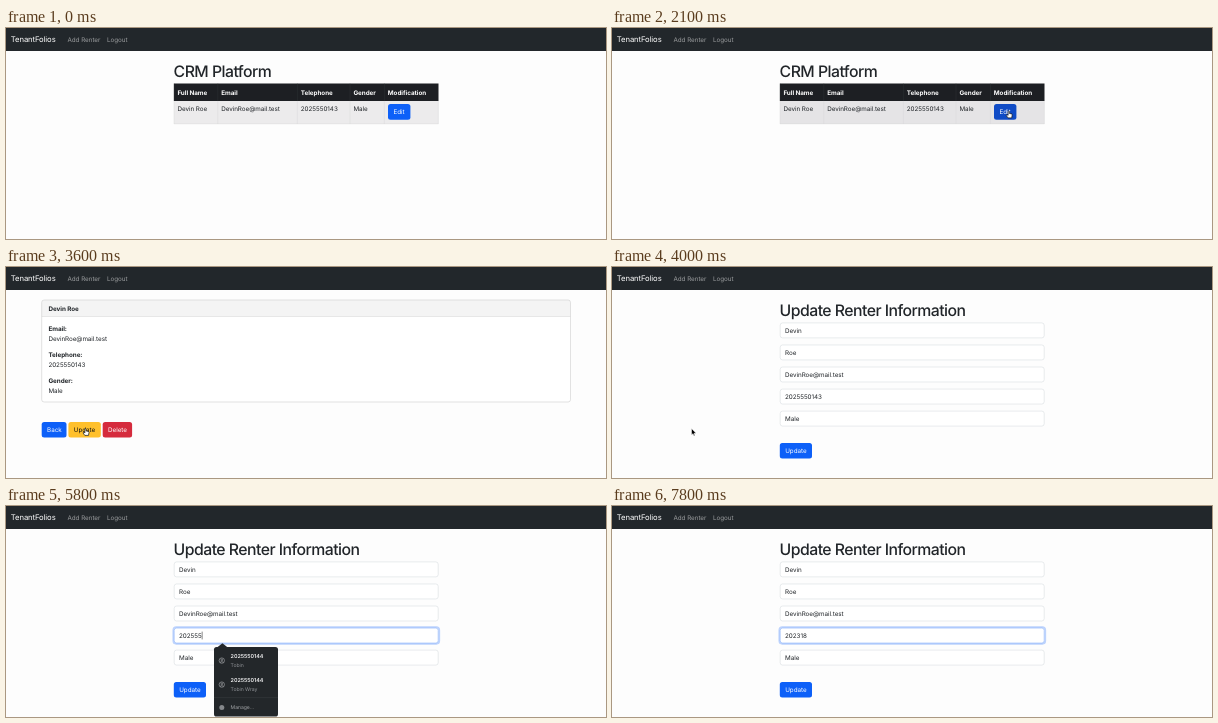
An HTML page that plays this animation: 600x211 px, repeating every 8 s.

```html
<!DOCTYPE html>
<html lang="en">
<head>
<meta charset="utf-8">
<title>CRM Platform</title>
<style>
html, body { margin: 0; width: 100%; height: 100%; overflow: hidden; background: #fdfdfd; }
svg { display: block; width: 600px; height: 211px; }
text { font: 400 6.3px Inter, "Liberation Sans", sans-serif; letter-spacing: -.04px; text-rendering: geometricPrecision; white-space: pre; }
text.b { font-weight: 700; }
text.h1 { font-size: 15.8px; font-weight: 500; letter-spacing: -.53px; }
text.brand { font-size: 7.7px; letter-spacing: -.1px; }
text.tip { font-size: 5.4px; font-weight: 600; }
text.sub { font-size: 5.1px; }
</style>
</head>
<body>
<svg id="stage" viewBox="0 0 600 211"></svg>
<script>
const LOOP = 8000, STEP = 100;
const INK = '#212529';
const BLUE = '#0d60f8', BLUE_HOVER = '#0f51d0', BLUE_DOWN = '#0f4bc6';
const YELLOW = '#ffb80a', YELLOW_HOVER = '#ffc02c', YELLOW_DOWN = '#ffc648';

const FIRST = 'Devin', LAST = 'Roe', NAME = FIRST + ' ' + LAST;
const EMAIL = 'DevinRoe@mail.test', PHONE = '2025550143', GENDER = 'Male';
const SAVED = [['2025550144', 'Tobin'], ['2025550144', 'Tobin Wray']];

const stage = document.getElementById('stage');

function add(parent, tag, attrs = {}, content) {
  const el = document.createElementNS('http://www.w3.org/2000/svg', tag);
  for (const key in attrs) el.setAttribute(key, attrs[key]);
  if (content) el.textContent = content;
  parent.appendChild(el);
  return el;
}
const group = parent => add(parent, 'g');
const rect = (p, x, y, width, height, fill, more) =>
  add(p, 'rect', { x, y, width, height, fill, ...more });
const path = (p, d, more) => add(p, 'path', { d, ...more });
const text = (p, x, y, content, cls = '', fill = INK) =>
  add(p, 'text', { x, y, class: cls, fill }, content);
const show = (el, on) => el.setAttribute('display', on ? 'inline' : 'none');

function button(p, x, y, w, label, fill, color = '#fff') {
  const box = rect(p, x, y, w, 15.6, fill, { rx: 2.5 });
  text(p, x + 5.4, y + 10.2, label, '', color);
  return box;
}

// Navigation bar
rect(stage, 0, 0, 600, 211, '#fdfdfd');
rect(stage, 0, 0, 600, 23, '#22272b');
text(stage, 4.8, 14.3, 'TenantFolios', 'brand', '#fff');
text(stage, 61.5, 14, 'Add Renter', '', '#9a9c9e');
text(stage, 101, 14, 'Logout', '', '#9a9c9e');

// List page
const list = group(stage);
text(list, 167.6, 48.8, 'CRM Platform', 'h1');
const row = rect(list, 168, 73, 264.5, 23, '#ecebec');
rect(list, 168, 55.5, 264.5, 17.5, '#1d1f23');
const columns = [
  [168, 'Full Name', NAME], [211.8, 'Email', EMAIL], [291.4, 'Telephone', PHONE],
  [344, 'Gender', GENDER], [378.4, 'Modification', '']
];
for (const [x, head, value] of columns) {
  path(list, `M${x} 55.5V73`, { stroke: '#34383c', 'stroke-width': .4 });
  path(list, `M${x} 73V96`, { stroke: '#d3d4d6', 'stroke-width': .4 });
  text(list, x + 3.4, 66.8, head, 'b', '#fff');
  text(list, x + 3.4, 83.4, value);
}
path(list, 'M168 95.8H432.3V73', { fill: 'none', stroke: '#d3d4d6', 'stroke-width': .4 });
const edit = button(list, 382, 76.1, 22.4, 'Edit', BLUE);

// Detail page
const detail = group(stage);
rect(detail, 35.7, 33, 528.8, 102, '#fff', { rx: 2.4 });
path(detail, 'M35.7 49.5V35.4Q35.7 33 38.1 33H562.1Q564.5 33 564.5 35.4V49.5Z', { fill: '#f4f4f4' });
path(detail, 'M35.7 49.5H564.5', { stroke: '#d4d4d4', 'stroke-width': .5 });
rect(detail, 35.7, 33, 528.8, 102, 'none', { rx: 2.4, stroke: '#cfcfcf', 'stroke-width': .6 });
text(detail, 42.4, 43.9, NAME, 'b');
[['Email:', EMAIL], ['Telephone:', PHONE], ['Gender:', GENDER]].forEach(([label, value], i) => {
  text(detail, 42.4, 63.8 + 26.1 * i, label, 'b');
  text(detail, 42.4, 73.7 + 26.1 * i, value);
});
button(detail, 35.7, 155, 24.8, 'Back', BLUE);
const update = button(detail, 62.4, 155, 32.4, 'Update', YELLOW, '#111');
button(detail, 96.7, 155, 29.4, 'Delete', '#d52b3d');

// Form page
const form = group(stage);
text(form, 167.6, 48.8, 'Update Renter Information', 'h1');
const ring = rect(form, 167.3, 121.2, 266, 16.6, 'none', { rx: 3, stroke: '#bdd3fd', 'stroke-width': 1.7 });
const fields = [FIRST, LAST, EMAIL, PHONE, GENDER].map((value, i) => {
  const y = 55.9 + 22.05 * i;
  const box = rect(form, 168.2, y, 264, 15, '#fff', { rx: 2.4, stroke: '#d9dde1', 'stroke-width': .6 });
  return { box, label: text(form, 173, y + 9.9, value) };
});
const phone = fields[3];
const caret = rect(form, 0, 125.6, .5, 7.8, '#111');
button(form, 167.8, 175.9, 32.2, 'Update', BLUE);

// Suggestions
const popup = group(form);
path(popup, 'M211 141.5L216.4 137.3L221.8 141.5Z', { fill: '#23272a' });
rect(popup, 208, 141, 64, 69.6, '#23272a', { rx: 2.6 });
SAVED.forEach(([number, owner], i) => {
  const y = 154.6 + 24 * i;
  const icon = add(popup, 'g', { fill: 'none', stroke: '#a9acaf', 'stroke-width': .6 });
  add(icon, 'circle', { cx: 215.8, cy: y, r: 2.7 });
  add(icon, 'circle', { cx: 215.8, cy: y - .7, r: .85 });
  path(icon, `M214 ${y + 1.8}Q215.8 ${y + .2} 217.6 ${y + 1.8}`);
  text(popup, 224.6, y - 2.5, number, 'tip', '#f2f2f3');
  text(popup, 224.6, y + 6.2, owner, 'sub', '#8f9296');
});
path(popup, 'M208 191.6H272', { stroke: '#3b3f43', 'stroke-width': .5 });
add(popup, 'circle', { cx: 215.8, cy: 201.4, r: 2.5, fill: '#85888b' });
text(popup, 224.6, 203.3, 'Manage...', 'sub', '#a0a3a6');

// Pointers, each with its hot spot at 0,0
const pointer = group(stage);
const arrow = path(pointer, 'M0 0V6.5L1.5 5.2L2.5 7.4L3.5 7L2.5 4.8H4.6Z',
  { fill: '#000', stroke: '#fff', 'stroke-width': .5 });
const hand = path(pointer,
  'M-.6 .4Q0-.5 .6 .4V2.4L2.9 2.9Q3.6 3.1 3.5 4L3 6.9H-.7L-2.4 4.5Q-2.5 3.5-1.5 3.7L-.6 4.4Z',
  { fill: '#fff', stroke: '#111', 'stroke-width': .7, 'stroke-linejoin': 'round' });
const beam = path(pointer, 'M-1.3-3.2Q0-3.2 0-2.4Q0-3.2 1.3-3.2M0-2.4V2.4M-1.3 3.2Q0 3.2 0 2.4Q0 3.2 1.3 3.2',
  { fill: 'none', stroke: '#222', 'stroke-width': .7 });

// Pointer path: time, x, y
const route = [
  [300, 415, 187], [500, 413, 160], [700, 406, 118], [900, 399, 88], [1100, 395.5, 82],
  [1500, 395.5, 82], [1700, 396.7, 83], [2300, 396.7, 83], [2500, 300, 106], [2700, 175, 130],
  [2900, 133, 136], [3100, 88, 146], [3300, 50, 151], [3500, 74, 160], [3600, 79.5, 161.5],
  [4000, 79.5, 161.5], [4300, 190, 148], [4500, 204, 141], [4700, 217, 128.4], [5300, 217, 128.4]
];
// Field edits: time, value
const edits = [
  [4800, PHONE],
  ...[[5300, 9], [5500, 8], [5700, 7], [5800, 6], [5900, 4], [6000, 3]].map(([t, n]) => [t, PHONE.slice(0, n)]),
  [6700, '2023'], [7000, '20231'], [7300, '202318']
];

function pointAt(t) {
  const i = Math.max(1, route.findIndex(p => p[0] >= t));
  const [t0, x0, y0] = route[i - 1], [t1, x1, y1] = route[i];
  const k = (t - t0) / (t1 - t0);
  return [x0 + (x1 - x0) * k, y0 + (y1 - y0) * k];
}
const inside = (x, y, l, t, r, b) => x >= l && x <= r && y >= t && y <= b;

function drawPointer(t, page) {
  const visible = t >= 300 && t < 5300;
  show(pointer, visible);
  const [x, y] = visible ? pointAt(t) : [-9, -9];
  pointer.setAttribute('transform', `translate(${x} ${y})`);
  const onEdit = page === list && inside(x, y, 382, 76, 404.4, 92);
  const onUpdate = page === detail && inside(x, y, 62.4, 155, 94.8, 171);
  const onField = page === form && inside(x, y, 168, 122, 432, 137);
  show(hand, onEdit || onUpdate);
  show(beam, onField);
  show(arrow, !onEdit && !onUpdate && !onField);
  row.setAttribute('fill', inside(x, y, 168, 73, 432, 96) ? '#e5e4e6' : '#ecebec');
  edit.setAttribute('fill', onEdit ? (t >= 2000 ? BLUE_DOWN : BLUE_HOVER) : BLUE);
  update.setAttribute('fill', onUpdate ? (t >= 3800 ? YELLOW_DOWN : YELLOW_HOVER) : YELLOW);
}

function drawForm(t) {
  const focus = Math.min(1, Math.max(0, (t - 4720) / 150));
  ring.setAttribute('opacity', focus);
  phone.box.setAttribute('stroke', focus ? (focus < 1 ? '#afc6ec' : '#86b0f8') : '#d9dde1');
  const [since, value] = edits.filter(e => e[0] <= t).pop() || [Infinity, PHONE];
  phone.label.textContent = value;
  show(caret, t >= since && (t - since) % 1000 < 500);
  caret.setAttribute('x', 173.2 + phone.label.getComputedTextLength());
  show(popup, t >= 5400 && t < 6800);
}

function draw(time) {
  const t = Math.floor(time % LOOP / STEP) * STEP;
  const page = t < 2300 ? list : t < 4000 ? detail : form;
  for (const p of [list, detail, form]) show(p, p === page);
  if (page === form) drawForm(t);
  drawPointer(t, page);
}

let start;
function tick(now) {
  start ??= now;
  draw(now - start);
  requestAnimationFrame(tick);
}
draw(0);
requestAnimationFrame(tick);
</script>
</body>
</html>
```
